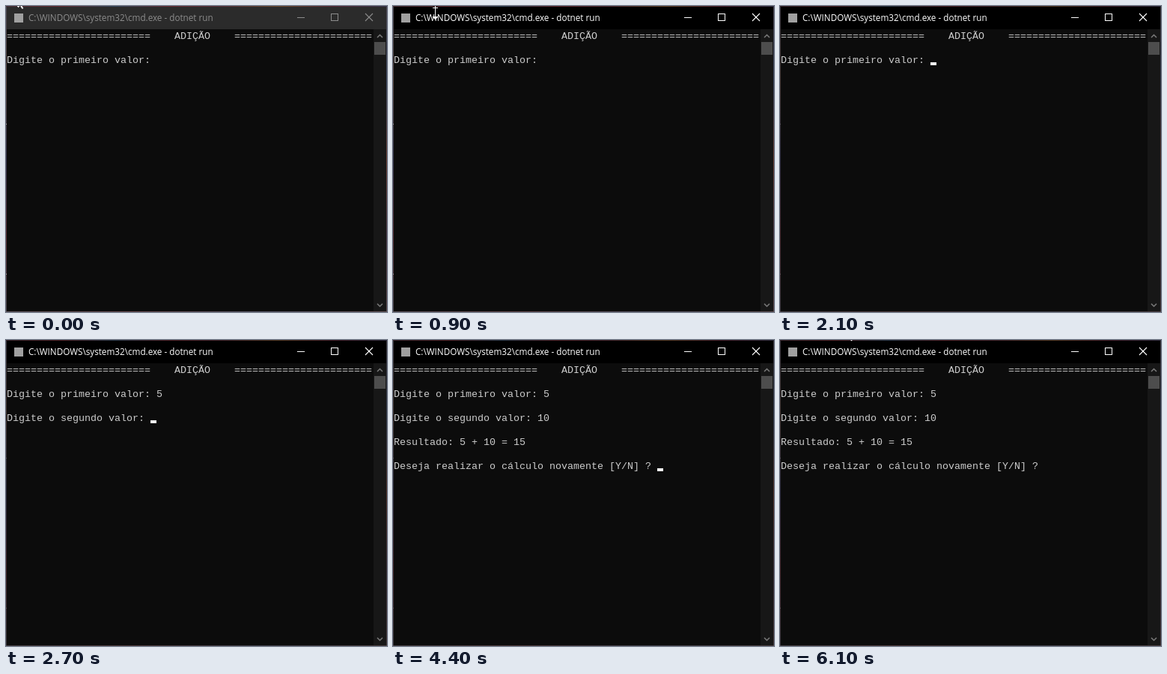
These frames come from a looping animation (509 by 408 pixels, 6200 ms). An HTML page with a canvas:

```html
<!DOCTYPE html>
<html lang="pt">
<head>
<meta charset="utf-8">
<title>Adição</title>
<style>
  html, body { margin: 0; width: 100%; height: 100%; overflow: hidden; background: #0c0c0c; }
  canvas { display: block; }
</style>
</head>
<body>
<canvas id="stage" width="509" height="408"></canvas>
<script>
const W = 509, H = 408, LOOP = 6200;
const CELL = 8, ROW = 16, LEFT = 1, TOP = 31;
const ctx = document.getElementById('stage').getContext('2d');

const HEADING = '='.repeat(24) + '    ADIÇÃO    ' + '='.repeat(23);
const FIRST = 'Digite o primeiro valor: ';
const SECOND = 'Digite o segundo valor: ';
const RESULT = 'Resultado: 5 + 10 = 15';
const AGAIN = 'Deseja realizar o cálculo novamente [Y/N] ? ';

// [start ms, typed first value, typed second value, prompt step, caret shown]
const STATES = [
  [0, '', '', 0, false],
  [1000, '', '', 0, true],
  [1400, '', '', 0, false],
  [1600, '5', '', 0, true],
  [1900, '5', '', 0, false],
  [2100, '', '', 0, true],
  [2200, '5', '', 0, true],
  [2400, '5', '', 0, false],
  [2700, '5', '', 1, true],
  [3400, '5', '', 1, false],
  [3700, '5', '1', 1, true],
  [3800, '5', '10', 1, true],
  [3900, '5', '10', 1, false],
  [4400, '5', '10', 2, true],
  [4900, '5', '10', 2, false],
  [5400, '5', '10', 2, true],
  [6100, '5', '10', 2, false]
];

function rect(x, y, w, h, color) {
  ctx.fillStyle = color;
  ctx.fillRect(x, y, w, h);
}

function line(points, color, width = 1) {
  ctx.strokeStyle = color;
  ctx.lineWidth = width;
  ctx.beginPath();
  points.forEach(([x, y], i) => i ? ctx.lineTo(x, y) : ctx.moveTo(x, y));
  ctx.stroke();
}

function edge(x, y, w, h, colors) {
  const g = ctx.createLinearGradient(x, y, w > h ? x + w : x, w > h ? y : y + h);
  colors.forEach((c, i) => g.addColorStop(i / (colors.length - 1), c));
  rect(x, y, w, h, g);
}

// The desktop shows through the thin border, which darkens once focused.
function drawEdges(t) {
  const dim = Math.min(Math.max((t - 800) / 400, 0), 1);
  ctx.globalAlpha = 1 - 0.3 * dim;
  edge(0, 0, W, 1, ['#4a3038', '#6a2a30', '#34485e', '#6b2b33', '#59303a', '#6e4a2c', '#5a2634', '#3c3850']);
  edge(0, 1, 1, H - 1, ['#4a4550', '#5a4844', '#34344e', '#5a3038', '#4a4650']);
  edge(W - 1, 1, 1, H - 1, ['#4a4450', '#3a4660', '#6a4038', '#4a3a4a', '#5a484c']);
  edge(0, H - 1, W, 1, ['#585058', '#64484c', '#505060', '#605054']);
  ctx.globalAlpha = 1 - 0.7 * dim;
  rect(0, 157, 1, 1, '#c0c0c0');
  rect(0, 357, 1, 1, '#c0c0c0');
  ctx.globalAlpha = 1;
}

function drawTitle(active) {
  const ink = active ? '#ffffff' : '#8c8c8c';
  rect(1, 1, W - 2, 30, active ? '#000000' : '#2b2b2b');
  rect(11, 10, 12, 12, '#a0a0a0');
  ctx.fillStyle = ink;
  ctx.font = '11.7px "Open Sans", "Noto Sans", sans-serif';
  ctx.fillText('C:\\WINDOWS\\system32\\cmd.exe - dotnet run', 30, 20);
  rect(389, 15, 10, 1, ink);
  ctx.strokeStyle = ink;
  ctx.lineWidth = 1;
  ctx.strokeRect(434.5, 10.5, 9, 9);
  line([[480, 10], [490, 20]], ink, 1.1);
  line([[490, 10], [480, 20]], ink, 1.1);
}

function drawScrollbar() {
  rect(491, 31, 17, H - 32, '#171717');
  rect(492, 48, 15, 17, '#4d4d4d');
  line([[496, 42], [499.5, 38.5], [503, 42]], '#7a7a7a', 1.5);
  line([[496, 397], [499.5, 400.5], [503, 397]], '#7a7a7a', 1.5);
}

function print(text, row) {
  ctx.fillStyle = '#cccccc';
  ctx.font = '13.333px "Liberation Mono", "Noto Sans Mono", monospace';
  ctx.fillText(text, LEFT, TOP + row * ROW + 13);
}

function drawConsole(t) {
  const [, a, b, step, caret] = STATES.filter(s => s[0] <= t).pop();
  const lines = [FIRST + a];
  if (step > 0) lines.push(SECOND + b);
  if (step > 1) lines.push(RESULT, AGAIN);
  print(HEADING, 0);
  lines.forEach((text, i) => print(text, 2 + 2 * i));
  if (caret) {
    const row = 2 * lines.length;
    const col = lines[lines.length - 1].length;
    rect(LEFT + col * CELL, TOP + (row + 1) * ROW - 4, CELL, 4, '#f2f2f2');
  }
}

// Vertical resize pointer, placed by its centre and bottom tip.
function resizePointer(x, bottom) {
  ctx.save();
  ctx.translate(x, bottom);
  rect(-4, -18, 9, 3, '#000000');
  rect(-1, -17, 3, 14, '#000000');
  rect(-3, -17, 7, 1, '#ffffff');
  rect(0, -19, 1, 16, '#ffffff');
  ctx.beginPath();
  ctx.moveTo(-3.5, -5);
  ctx.lineTo(4.5, -5);
  ctx.lineTo(0.5, -0.5);
  ctx.closePath();
  ctx.fillStyle = '#ffffff';
  ctx.fill();
  ctx.restore();
}

function arrowTail() {
  rect(15, 0, 3, 1, '#ffffff');
  rect(16, 1, 1, 1, '#ffffff');
  line([[20, 0], [22.5, 3.5]], '#ffffff', 2);
}

function drawPointer(t) {
  const tick = Math.floor(t / 100) * 100;
  if (tick < 500) arrowTail();
  else if (tick < 1000) {
    const k = Math.min((tick - 400) / 300, 1);
    const ease = 1 - (1 - k) ** 2;
    resizePointer(Math.round(20 + 36 * ease), Math.round(4 + 15 * ease));
  } else if (tick >= 5200) {
    const k = Math.min(Math.max((tick - 5300) / 600, 0), 1);
    resizePointer(Math.round(74 + 21 * k), Math.round(18 - 16 * k));
  }
}

function frame() {
  const t = performance.now() % LOOP;
  rect(0, 0, W, H, '#0c0c0c');
  drawEdges(t);
  drawTitle(t >= 900);
  drawScrollbar();
  drawConsole(t);
  drawPointer(t);
  requestAnimationFrame(frame);
}
frame();
</script>
</body>
</html>
```
